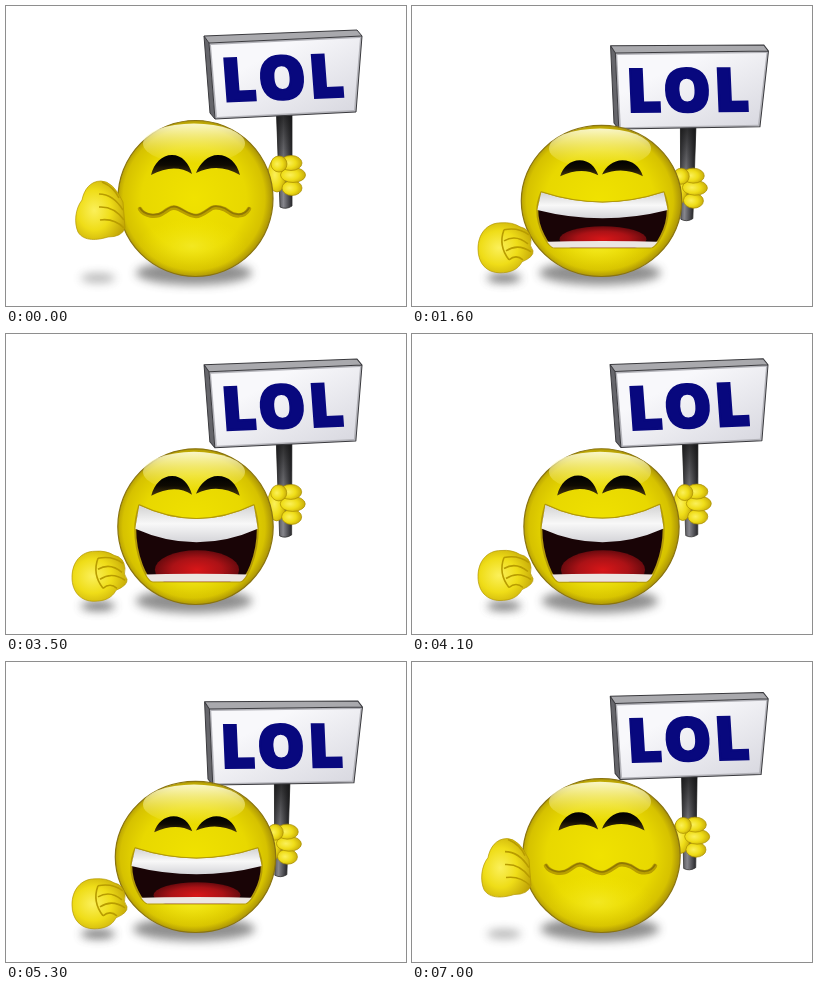
Write an HTML page that moves like this. It is 400 px wide and 300 px high and loops after 7.05 s.

```html
<!DOCTYPE html>
<html>
<head>
<meta charset="utf-8">
<style>
html, body { margin: 0; width: 100%; height: 100%; overflow: hidden; background: #fff }
svg { display: block; width: 100vw; height: 100vh }
</style>
</head>
<body>
<svg viewBox="0 0 400 300">
  <defs>
    <radialGradient id="ball" cx=".49" cy=".5" r=".52">
      <stop offset="0" stop-color="#f0e200"/><stop offset=".65" stop-color="#e8d800"/>
      <stop offset=".88" stop-color="#d6c200"/><stop offset="1" stop-color="#a08808"/>
    </radialGradient>
    <linearGradient id="shine" x2="0" y2="1">
      <stop offset="0" stop-color="#fffee0" stop-opacity=".9"/><stop offset="1" stop-color="#fff880" stop-opacity="0"/>
    </linearGradient>
    <radialGradient id="glow">
      <stop offset="0" stop-color="#fff94a" stop-opacity=".45"/><stop offset="1" stop-color="#fff500" stop-opacity="0"/>
    </radialGradient>
    <radialGradient id="skin" cx=".38" cy=".5" r=".68">
      <stop offset="0" stop-color="#fbf05a"/><stop offset=".5" stop-color="#efdd18"/><stop offset="1" stop-color="#bfa206"/>
    </radialGradient>
    <linearGradient id="board" x2="1" y2="1">
      <stop offset=".3" stop-color="#f8f8fb"/><stop offset="1" stop-color="#d6d6de"/>
    </linearGradient>
    <linearGradient id="pole">
      <stop offset="0" stop-color="#3c3c40"/><stop offset=".45" stop-color="#86868c"/><stop offset="1" stop-color="#28282c"/>
    </linearGradient>
    <linearGradient id="poleShade" x2="0" y2="1">
      <stop offset="0" stop-color="#111" stop-opacity=".8"/><stop offset="1" stop-color="#111" stop-opacity="0"/>
    </linearGradient>
    <linearGradient id="teeth" x2="0" y2="1">
      <stop offset="0" stop-color="#d2d2d2"/><stop offset=".5" stop-color="#f8f8f8"/><stop offset="1" stop-color="#d4d4d8"/>
    </linearGradient>
    <linearGradient id="brow" x2="0" y2="1">
      <stop offset="0" stop-color="#000"/><stop offset=".5" stop-color="#0e0a02"/><stop offset="1" stop-color="#4a390c"/>
    </linearGradient>
    <radialGradient id="tongue">
      <stop offset="0" stop-color="#d81618"/><stop offset=".6" stop-color="#ab1216"/><stop offset="1" stop-color="#6a0a0e"/>
    </radialGradient>
    <filter id="soft" x="-50%" y="-150%" width="200%" height="400%"><feGaussianBlur stdDeviation="5"/></filter>
    <clipPath id="inside"><path id="hole"/></clipPath>
  </defs>

  <ellipse id="ground" cx="188" cy="267" ry="12" fill="#444" opacity=".6" filter="url(#soft)"/>
  <ellipse id="fistShade" cx="92" cy="272" rx="17" ry="4.5" fill="#555" filter="url(#soft)"/>

  <g id="sign">
    <path d="M270.5 108H286L286 200Q280 204 274 201Z" fill="url(#pole)" stroke="#333" stroke-width=".8"/>
    <path d="M270.5 108H286V165H272Z" fill="url(#poleShade)"/>
    <path d="M198 30 351 24 356 30 203 37Z" fill="#a9a9ad"/>
    <path d="M198 30 203 37 209 113 204 107Z" fill="#66666b"/>
    <path d="M203 37 356 30 350 106 209 113Z" fill="#b4b4ba"/>
    <path d="M205 39 354 32 348 104 211 111Z" fill="url(#board)"/>
    <path d="M198 30 351 24 356 30 350 106 209 113 204 107ZM198 30 203 37 356 30M203 37 209 113" fill="none" stroke="#3a3a3e" stroke-linejoin="round"/>
    <text transform="translate(217 95.5) rotate(-2.3) skewX(2)" font-family="'Open Sans','Noto Sans',sans-serif" font-weight="800" font-size="60" letter-spacing="3" fill="#08087e" stroke="#08087e" stroke-width="2.2">LOL</text>
    <g fill="url(#skin)" stroke="#a88d00" stroke-width=".7">
      <ellipse cx="271" cy="169" rx="9" ry="17"/>
      <ellipse cx="286" cy="182" rx="10" ry="7.5"/>
      <ellipse cx="287" cy="169" rx="12.5" ry="7.5"/>
      <ellipse cx="285" cy="157" rx="11" ry="7.5"/>
      <ellipse cx="273" cy="158" rx="8" ry="8"/>
    </g>
  </g>

  <ellipse id="head" cx="189.5" fill="url(#ball)" stroke="#8a7410" stroke-width="1.2"/>
  <ellipse cx="186" cy="240" rx="55" ry="28" fill="url(#glow)"/>
  <ellipse id="gloss" cx="188" rx="51" ry="20" fill="url(#shine)"/>

  <g id="eyes" fill="url(#brow)">
    <path d="M145 20C148 8 156 0 166 0C176 0 183 8 186 19C174 11 160 12 145 20Z"/>
    <path d="M190 18C194 8 202 0 212 0C223 0 231 8 234 20C220 12 206 10 190 18Z"/>
  </g>

  <g id="wave" fill="none" stroke-linecap="round">
    <path d="M134 203C138 210 150 212 157 207S167 200 173 203S184 210 190 210S202 204 206 202S218 202 223 206S238 212 243 203" stroke="#b89e00" stroke-width="4.5"/>
    <path d="M134 202C138 209 150 211 157 206S167 199 173 202S184 209 190 209S202 203 206 201S218 201 223 205S238 211 243 202" stroke="#8f7604" stroke-width="1.6"/>
  </g>

  <g id="mouth">
    <path id="rim" fill="#190406" stroke="#b39a08" stroke-width="2" stroke-linejoin="round"/>
    <g clip-path="url(#inside)">
      <ellipse id="tongueShape" cx="191" fill="url(#tongue)"/>
      <path id="lower" fill="#ece6e2"/>
      <path id="upper" fill="url(#teeth)"/>
    </g>
  </g>

  <g id="sideFist" fill="url(#skin)" stroke="#b39700" stroke-width=".7">
    <path d="M95 175C84 175 78 184 76 194C69 203 68 217 72 226C78 236 92 234 102 231Q116 231 119 222L117 196Q107 175 95 175Z"/>
    <path d="M93 188Q107 188 117 204M93 201Q108 200 118 214M94 214Q108 212 118 222M96 176Q108 181 113 192" fill="none" stroke="#b89c00" stroke-width="1.6"/>
  </g>
  <g id="fist" fill="url(#skin)" stroke="#b39700" stroke-width=".7">
    <path d="M89 215C75 215 66 226 66 241C66 256 75 265 88 265C98 265 106 262 110 254Q122 249 121 243Q117 238 119 232Q118 221 108 219Q100 214 89 215Z"/>
    <path d="M92 222Q106 219 117 227M92 233Q104 226 116 236M94 243Q106 235 119 244M97 252Q104 246 111 252M92 222Q86 238 97 252" fill="none" stroke="#b89c00" stroke-width="1.6"/>
  </g>
</svg>
<script>
const LOOP = 7050, STEP = 50, BEAT = 690, LAST = 9 * BEAT;
const $ = id => document.getElementById(id);
const set = (id, attrs) => { for (const a in attrs) $(id).setAttribute(a, attrs[a]); };
const mix = (a, b, k) => a + (b - a) * k;
const ease = (t, a, b) => {
  const u = Math.min(1, Math.max(0, (t - a) / (b - a)));
  return u * u * (3 - 2 * u);
};

function drawMouth(k, open) {
  // squash the open mouth towards the closed lip line
  const y = (tall, flat) => mix(206, mix(tall, flat, k), open);
  const cx = 190.5;
  const lip = mix(57, 63, k), wide = mix(61, 67, k), jaw = mix(43, 50, k);
  const top = y(170, 193), dip = y(198, 210), edge = y(194, 208), sag = y(222, 220);
  const base = y(248, 239), side = y(222, 222);
  const arch = `M${cx - lip} ${top}Q${cx} ${dip} ${cx + lip} ${top}`;
  const d = `${arch}Q${cx + wide} ${mix(top, edge, .6)} ${cx + wide} ${edge}` +
    `C${cx + wide} ${side} ${cx + jaw + 6} ${base} ${cx + jaw} ${base}H${cx - jaw}` +
    `C${cx - jaw - 6} ${base} ${cx - wide} ${side} ${cx - wide} ${edge}` +
    `Q${cx - wide} ${mix(top, edge, .6)} ${cx - lip} ${top}Z`;
  set('rim', { d });
  set('hole', { d });
  set('upper', { d: `${arch}L${cx + wide} ${edge}Q${cx} ${sag} ${cx - wide} ${edge}Z` });
  const rise = y(241, 234);
  set('lower', { d: `M${cx - wide} ${rise}Q${cx} ${rise - 2} ${cx + wide} ${rise}V${base + 2}H${cx - wide}Z` });
  set('tongueShape', { cy: y(236, 232), rx: mix(42, 44, k), ry: mix(20, 10, k) * open });
  set('mouth', { opacity: Math.min(1, open * 6) });
  set('wave', { opacity: Math.max(0, 1 - open * 6), transform: `translate(0 ${3 * k})` });
}

function draw(t) {
  const turns = t < LAST ? t / BEAT : 9 + (t - LAST) / 975;
  const a = turns * 2 * Math.PI;
  const k = (1 - Math.cos(a)) / 2;   // 0 stretched, 1 squashed
  const open = ease(t, 100, 500) * (1 - ease(t, 6250, 6700));
  const ry = 78 - 3.5 * k;

  set('head', { rx: 77.5 + 3.8 * k, ry, cy: 270.5 - ry });
  set('gloss', { cy: 270.5 - 2 * ry + 23 });
  set('ground', { rx: 58 + 4 * k });
  set('sign', { transform: `translate(${-k} ${17.5 * k}) rotate(${2.7 * k} 277 67)` });
  const brow = mix(149 + 4 * k, 141 + 18.5 * k, open);
  set('eyes', { transform: `translate(${19 * k} ${brow}) scale(${1 - .1 * k} ${1 - .28 * k})` });
  drawMouth(k, open);

  const pound = 8 * (Math.cos(a) - Math.cos(2 * a));
  const front = open > .4;
  set('fist', { visibility: front ? 'visible' : 'hidden', transform: `translate(0 ${pound - 30 * (1 - open)})` });
  set('sideFist', { visibility: front ? 'hidden' : 'visible', transform: `translate(0 ${5 * k + 30 * open})` });
  set('fistShade', { opacity: mix(.45, .8 + pound / 60, open) });
}

function tick(now) {
  draw(Math.floor((now % LOOP) / STEP) * STEP);
  requestAnimationFrame(tick);
}
draw(0);
requestAnimationFrame(tick);
</script>
</body>
</html>
```
